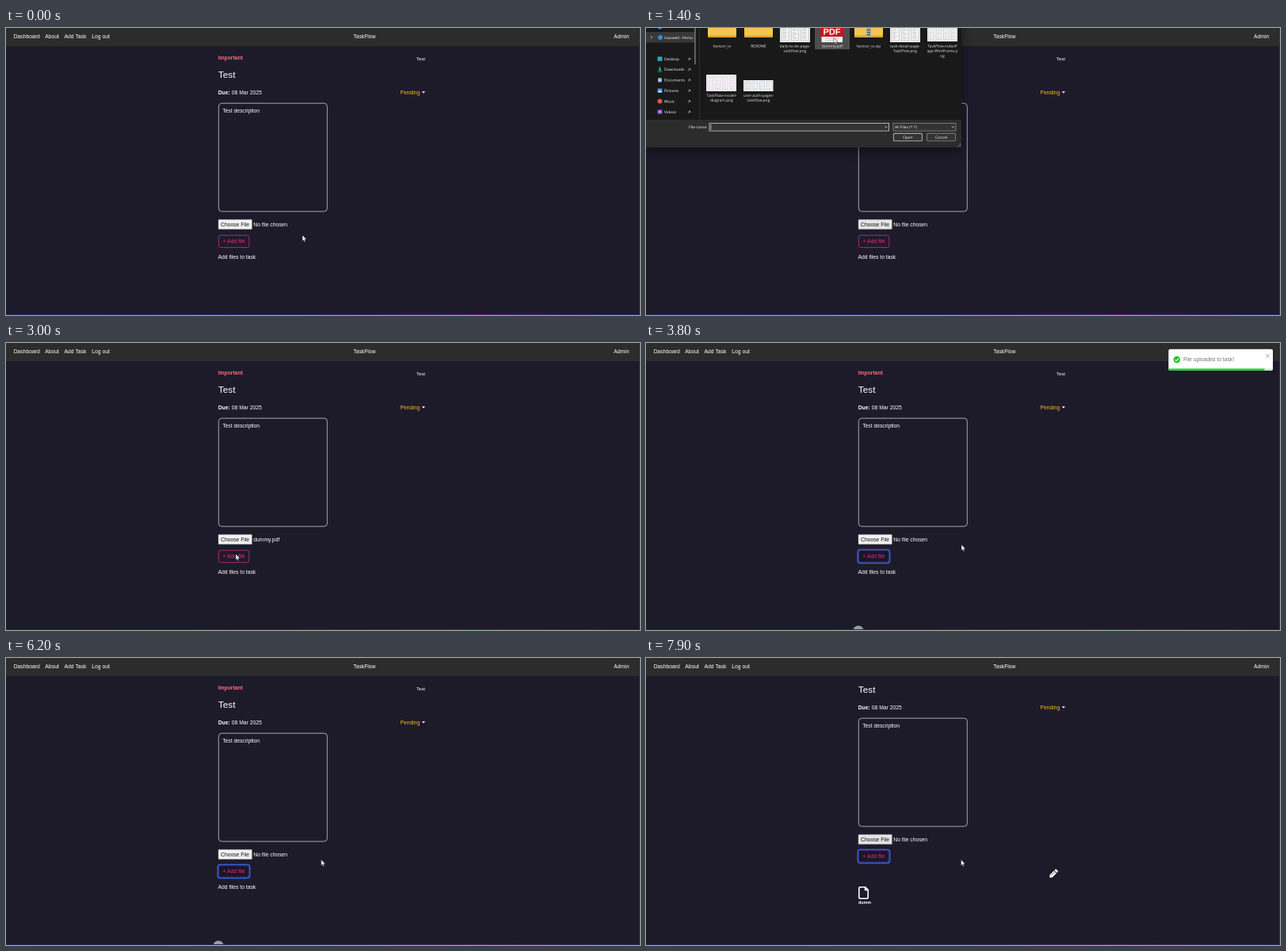
An HTML page with a canvas for the animation above (8 s loop, 800 px wide and 363 px high).

```html
<!DOCTYPE html>
<html lang="en">
<head>
<meta charset="utf-8">
<title>Task detail</title>
<style>
html, body { margin: 0; width: 800px; height: 363px; overflow: hidden; background: #1d1b2a; }
canvas { display: block; width: 800px; height: 363px; }
</style>
</head>
<body>
<canvas id="stage"></canvas>
<script>
const LOOP = 8000, STEP = 100;
const SANS = '"Liberation Sans", Arial, sans-serif';
const UI = '"Open Sans", "Noto Sans", sans-serif';
const dpr = Math.max(1, window.devicePixelRatio || 1);
const PAD = { x: 10, y: 20 };

function makeLayer(canvas, w, h, scale) {
  canvas.width = w * scale;
  canvas.height = h * scale;
  const c = canvas.getContext('2d');
  c.scale(scale, scale);
  return c;
}
const ctx = makeLayer(document.getElementById('stage'), 800, 363, dpr);

const clamp = v => Math.min(1, Math.max(0, v));
const ramp = (t, a, b) => clamp((t - a) / (b - a));
const smooth = p => p * p * (3 - 2 * p);

function text(c, s, x, y, o = {}) {
  c.font = `${o.bold ? 'bold ' : ''}${o.size || 6.75}px ${o.font || SANS}`;
  c.fillStyle = o.color || '#fff';
  c.textAlign = o.align || 'left';
  c.fillText(s, x, y);
}
function box(c, x, y, w, h, fill, stroke, r = 0, lw = 0.8) {
  c.beginPath();
  c.roundRect(x, y, w, h, r);
  if (fill) { c.fillStyle = fill; c.fill(); }
  if (stroke) { c.strokeStyle = stroke; c.lineWidth = lw; c.stroke(); }
}
function disc(c, x, y, r, fill) {
  c.beginPath();
  c.arc(x, y, r, 0, Math.PI * 2);
  c.fillStyle = fill;
  c.fill();
}
function path(c, pts, fill, stroke, lw = 0.8) {
  c.beginPath();
  pts.forEach(([x, y], i) => i ? c.lineTo(x, y) : c.moveTo(x, y));
  if (fill) { c.closePath(); c.fillStyle = fill; c.fill(); }
  if (stroke) { c.strokeStyle = stroke; c.lineWidth = lw; c.stroke(); }
}

// ---- file dialog ----
function chevron(c, x, y) {
  path(c, [[x - 1.6, y - 0.8], [x, y + 0.8], [x + 1.6, y - 0.8]], null, '#ccc', 0.6);
}
function folder(c, x, zip) {
  box(c, x - 18, -8, 36, 20, '#f4c64f', null, 2);
  box(c, x - 18, 9.5, 36, 2.5, '#dfa42f', null, 1);
  if (!zip) return;
  box(c, x - 3, -8, 6, 20, '#a9a9a4');
  for (let y = -7; y < 11; y += 3) box(c, x - 2, y, 4, 1.2, '#55554f');
}
function thumb(c, x, y, w, h, cols, tint) {
  box(c, x, y, w, h, '#f4f4f4');
  const cw = w / cols;
  for (let i = 0; i < cols; i++) {
    const px = x + i * cw + 1.5;
    box(c, px, y + 2, cw - 3, h - 4, null, tint, 0, 0.5);
    for (let ly = y + 4.5; ly < y + h - 3; ly += 2.6) {
      box(c, px + 1.5, ly, (cw - 6) * (0.55 + 0.4 * Math.sin(ly * 3 + i) ** 2), 0.6, tint);
    }
  }
}
function label(c, x, y, lines) {
  lines.forEach((s, i) => text(c, s, x, y + i * 6.3, { size: 4.9, font: UI, align: 'center', color: '#eee' }));
}
function sidebar(c) {
  box(c, -4, 5, 66, 13.5, '#383838');
  path(c, [[6, 10], [7.8, 11.8], [6, 13.6]], null, '#ccc', 0.6);
  disc(c, 18, 12, 3, '#2f8fe0');
  c.save();
  c.beginPath();
  c.rect(0, 0, 59.5, 30);
  c.clip();
  text(c, 'maxwell - Personal', 23, 13.8, { size: 4.9, font: UI });
  c.restore();
  box(c, 61.3, -20, 1.2, 66, '#8d8d8d');
  box(c, 67, -20, 0.6, 136, '#3a3a3a');
  disc(c, 17.5, -1.5, 3, '#3d8ddb');
  const rows = [['Desktop', '#27a9c4'], ['Downloads', '#2fb58c'], ['Documents', '#7fa6cf'],
    ['Pictures', '#3795e0'], ['Music', '#e2554f'], ['Videos', '#8b4fd0']];
  rows.forEach(([name, color], i) => {
    const y = 39 + i * 13.4;
    if (i === 1) {
      path(c, [[16.7, y - 3], [18.3, y - 3], [18.3, y], [20, y], [17.5, y + 2], [15, y], [16.7, y]], color);
      box(c, 14.5, y + 2.3, 6, 0.8, color);
    } else if (i === 4) disc(c, 17.5, y, 3, color);
    else box(c, i === 2 ? 15 : 14.5, y - 2.7, i === 2 ? 5 : 6, 5.4, color, null, 0.8);
    if (i === 2) for (const d of [-1, 0.5]) box(c, 16, y + d, 3, 0.6, '#fff');
    if (i === 3) path(c, [[15, y + 2], [17, y - 0.5], [18.3, y + 0.8], [19, y], [20, y + 2]], '#e8f4ff');
    if (i === 5) path(c, [[16.7, y - 1.3], [18.9, y], [16.7, y + 1.3]], '#fff');
    text(c, name, 23, y + 1.8, { size: 4.9, font: UI });
    path(c, [[54.6, y - 1.8], [57, y + 0.6], [55.8, y + 0.9], [53.7, y - 0.8]], '#aaa');
    path(c, [[54.9, y], [53, y + 2]], null, '#aaa', 0.6);
  });
}
function drawDialog(c, chosen) {
  box(c, -4, -20, 402, 171, '#191919');
  sidebar(c);
  box(c, 213, -20, 44, 47, chosen ? '#626262' : '#4d4d4d');
  folder(c, 96);
  folder(c, 142);
  folder(c, 281, true);
  thumb(c, 169, -10, 38, 28, 3, '#9c9c9c');
  thumb(c, 308, -10, 38, 28, 3, '#a5a5a5');
  thumb(c, 355, -10, 38, 27, 4, '#b0b0b0');
  thumb(c, 76, 59, 38, 21, 4, '#d6b3d8');
  thumb(c, 123, 66, 37.5, 14, 4, '#a8b4c8');
  box(c, 221.5, -10, 26.5, 28, '#f3f3f3');
  box(c, 219.5, -10, 30, 21, '#c8141c', null, 1);
  text(c, 'PDF', 234.5, 8.3, { size: 11, bold: true, align: 'center' });
  box(c, 226, 12.8, 17, 0.7, '#bbb');
  box(c, 226, 15, 14, 0.7, '#bbb');
  label(c, 96, 24.3, ['favicon_io']);
  label(c, 142, 24.3, ['README']);
  label(c, 188, 24.3, ['daily-to-do-page-', 'taskflow.png']);
  label(c, 235, 24.3, ['dummy.pdf']);
  label(c, 281, 24.3, ['favicon_io.zip']);
  label(c, 327, 24.3, ['task-detail-page-', 'TaskFlow.png']);
  label(c, 374, 24.3, ['TaskFlow-indexP', 'age-WireFrame.p', 'ng']);
  label(c, 95.5, 86.8, ['TaskFlow-model-', 'diagram.png']);
  label(c, 142, 86.8, ['user-auth-pages-', 'taskflow.png']);

  box(c, -4, 116, 402, 35, '#2c2c2c');
  text(c, 'File name:', 77.5, 127, { size: 4.9, font: UI, align: 'right' });
  box(c, 80, 120.5, 226.5, 9.6, '#333', '#d5d5d5');
  chevron(c, 303, 125.3);
  if (chosen) {
    box(c, 81.5, 122, 27, 6.6, '#0a72d0');
    text(c, 'dummy.pdf', 82.5, 127, { size: 4.9, font: UI });
  } else box(c, 81.7, 122, 0.6, 6.6, '#fff');
  box(c, 312, 120.5, 79, 9.6, '#333', '#8a8a8a');
  text(c, 'All Files (*.*)', 314, 127, { size: 4.9, font: UI });
  chevron(c, 387.5, 125.3);
  box(c, 312.3, 133.3, 36, 9.6, chosen ? '#454545' : '#333', '#d0d0d0', 1.5);
  box(c, 354.5, 133.3, 36, 9.6, '#333', '#8a8a8a', 1.5);
  text(c, 'Open', 330.3, 139.8, { size: 4.9, font: UI, align: 'center' });
  text(c, 'Cancel', 372.5, 139.8, { size: 4.9, font: UI, align: 'center' });
  for (let i = 0; i < 3; i++) for (let j = 0; j <= i; j++) box(c, 396.3 - j * 1.5, 146 + i * 1.5, 0.8, 0.8, '#999');
}
// Window as first mapped, before its controls have painted
function drawBlank(c) {
  box(c, -4, -20, 402, 171, '#2e2e2e');
  box(c, -4, -20, 402, 137, '#fff');
  [[52, 122, 23, 7], [77, 120, 229, 10.5], [311, 120, 80, 10.5], [311, 132.5, 38, 11],
    [353.5, 132.5, 37.5, 11], [390.5, 144, 7.5, 7]].forEach(r => box(c, ...r, '#fff'));
}
function dialogLayer(draw) {
  const canvas = document.createElement('canvas');
  const c = makeLayer(canvas, 412, 175, dpr * 2);
  c.translate(PAD.x, PAD.y);
  draw(c);
  return canvas;
}
let blank, plain, chosen;
function buildLayers() {
  blank = dialogLayer(drawBlank);
  plain = dialogLayer(c => drawDialog(c, false));
  chosen = dialogLayer(c => drawDialog(c, true));
}

function dialog(t) {
  if (t < 750 || t >= 2300) return;
  let scale = 1, alpha = 1;
  if (t < 900) {
    scale = 0.92;
    alpha = 0.61;
  } else if (t > 2050) {
    const p = ramp(t, 2050, 2230);
    scale = 1 - 0.066 * p;
    alpha = 1 - p;
  }
  const layer = t < 900 ? blank : t < 1600 ? plain : chosen;
  ctx.save();
  ctx.globalAlpha = alpha;
  ctx.translate(197.5, 35);
  ctx.scale(scale, scale);
  ctx.translate(-197.5, -35);
  ctx.shadowColor = 'rgba(0,0,0,.45)';
  ctx.shadowBlur = 14 * dpr;
  ctx.shadowOffsetY = 5 * dpr;
  ctx.drawImage(layer, -PAD.x, -PAD.y, 412, 175);
  ctx.restore();
}

// ---- page ----
function navbar() {
  box(ctx, 0, 0, 800, 23, '#2c2c2c');
  [['Dashboard', 9.7], ['About', 49.3], ['Add Task', 73.5], ['Log out', 108.3], ['TaskFlow', 438.3], ['Admin', 767]]
    .forEach(([s, x]) => text(ctx, s, x, 13.1));
}
function addButton(focused) {
  if (focused) {
    box(ctx, 267.3, 261.3, 40.2, 17, null, '#2f5fd0', 3, 1.8);
    box(ctx, 268.6, 262.6, 37.6, 14.4, '#1a1626', '#5a2a80', 2, 0.7);
  } else box(ctx, 268.3, 262.2, 38.5, 15.4, null, '#d62a78', 2.5);
  text(ctx, '+ Add file', 273.2, 271.9, { color: '#f0247f' });
}
function fileItem() {
  ctx.lineJoin = 'round';
  path(ctx, [[276.6, 308.7], [269.8, 308.7], [268.8, 309.8], [268.8, 322.3], [269.8, 323.2],
    [279.2, 323.2], [280.2, 322.3], [280.2, 312.4], [276.6, 308.7], [276.6, 312.4], [280.2, 312.4]], null, '#fff', 1.6);
  text(ctx, 'dumm', 268, 330, { size: 5.3, bold: true });
  ctx.save();
  ctx.translate(514, 292);
  ctx.rotate(-Math.PI / 4);
  path(ctx, [[-6.8, 0], [-4, -2.2], [3, -2.2], [3, 2.2], [-4, 2.2]], '#fff');
  box(ctx, 3.8, -2.2, 2.8, 4.4, '#fff', null, 0.8);
  path(ctx, [[-3.2, -0.6], [2.2, -0.6]], null, '#1d1b2a', 0.6);
  ctx.restore();
}
function page(t) {
  const listed = t >= 6700;
  ctx.save();
  if (listed) ctx.translate(0, -19);
  text(ctx, 'Important', 267.7, 40.2, { bold: true, color: '#fb6a7e' });
  text(ctx, 'Test', 528.8, 41.1, { size: 6, align: 'right' });
  text(ctx, 'Test', 267.8, 63.1, { size: 11.8 });
  text(ctx, 'Due:', 267.7, 83.5, { bold: true });
  text(ctx, '08 Mar 2025', 284.8, 83.5);
  text(ctx, 'Pending', 497.6, 83.9, { color: '#f3bb25' });
  path(ctx, [[524.6, 80.2], [529, 80.2], [526.8, 82.5]], '#fff');
  box(ctx, 268.3, 95.2, 137, 136.8, null, '#c9c9d0', 4);
  text(ctx, 'Test description', 273.2, 107);
  const over = t >= 500 && t < 2100 || listed;
  box(ctx, 268, 242.3, 42.3, 12.3, over ? '#e5e5e5' : '#f2f2f2', '#999', 0.5, 0.5);
  text(ctx, 'Choose File', 271.1, 250.8, { color: '#111' });
  text(ctx, t >= 2100 && t < 3500 ? 'dummy.pdf' : 'No file chosen', 312.3, 250.8);
  addButton(t >= 3200);
  if (listed) fileItem();
  else text(ctx, 'Add files to task', 267.6, 291.6);
  ctx.restore();
  if (t >= 3300 && !listed) disc(ctx, 268, 364.3, 6.8, '#9b9ba2');
}
function edges() {
  const g = ctx.createLinearGradient(0, 0, 800, 0);
  g.addColorStop(0, '#10285a');
  g.addColorStop(0.4, '#1b2a68');
  g.addColorStop(0.75, '#57246a');
  g.addColorStop(1, '#1c2a60');
  box(ctx, 0, 362, 800, 1, g);
  box(ctx, 799.2, 0, 0.8, 362, '#3b3a48');
}

function toast(t) {
  if (t < 3500 || t >= 6150) return;
  let dx = 0;
  if (t < 3700) dx = 140 * (1 - ramp(t, 3450, 3660)) ** 2;
  if (t > 5640) {
    const p = ramp(t, 5640, 6140);
    dx = p < 0.2 ? -50 * p : -10 + 160 * smooth((p - 0.2) / 0.8);
  }
  ctx.save();
  ctx.translate(dx, 0);
  ctx.shadowColor = 'rgba(0,0,0,.25)';
  ctx.shadowBlur = 4 * dpr;
  box(ctx, 659.3, 7.8, 131.7, 27, '#fff', null, 2);
  ctx.shadowColor = 'transparent';
  disc(ctx, 669.8, 21, 4.2, '#13c817');
  path(ctx, [[667.6, 21.1], [669.2, 22.7], [672.1, 19.4]], null, '#fff', 1.1);
  text(ctx, 'File uploaded to task!', 677.9, 23.3, { color: '#757575' });
  path(ctx, [[782.3, 14.2], [786.5, 18.4]], null, '#888', 0.8);
  path(ctx, [[786.5, 14.2], [782.3, 18.4]], null, '#888', 0.8);
  box(ctx, 659.3, 32.6, 131.7, 2.2, '#c6eec8', null, [0, 0, 2, 2]);
  box(ctx, 659.3, 32.6, 131.7 * (1 - ramp(t, 3640, 5640)), 2.2, '#0fd317', null, [0, 0, 0, 2]);
  ctx.restore();
}

// ---- pointer ----
const STOPS = [[0, 374, 262], [100, 374, 262], [500, 288, 247], [950, 288, 247], [1350, 237, 12],
  [1600, 237, 12], [1950, 339, 138], [2300, 339, 138], [2900, 290, 267], [3250, 290, 267],
  [3600, 398, 255], [8000, 397.5, 255]];
function pointer(t) {
  const i = STOPS.findIndex((s, k) => k > 0 && t <= s[0]);
  const [t0, x0, y0] = STOPS[i - 1], [t1, x1, y1] = STOPS[i];
  const p = smooth(ramp(t, t0, t1));
  ctx.save();
  ctx.translate(x0 + (x1 - x0) * p, y0 + (y1 - y0) * p);
  path(ctx, [[0, 0], [0, 7.4], [1.6, 6], [2.7, 8.4], [3.9, 7.8], [2.8, 5.5], [5, 5.2]], '#fff', '#222', 0.5);
  ctx.restore();
}

function draw(now) {
  const t = Math.floor((now % LOOP) / STEP) * STEP;
  box(ctx, 0, 0, 800, 363, '#1d1b2a');
  page(t);
  navbar();
  edges();
  dialog(t);
  toast(t);
  pointer(t);
}
buildLayers();
const start = performance.now();
function tick() {
  draw(performance.now() - start);
  requestAnimationFrame(tick);
}
tick();
</script>
</body>
</html>
```
